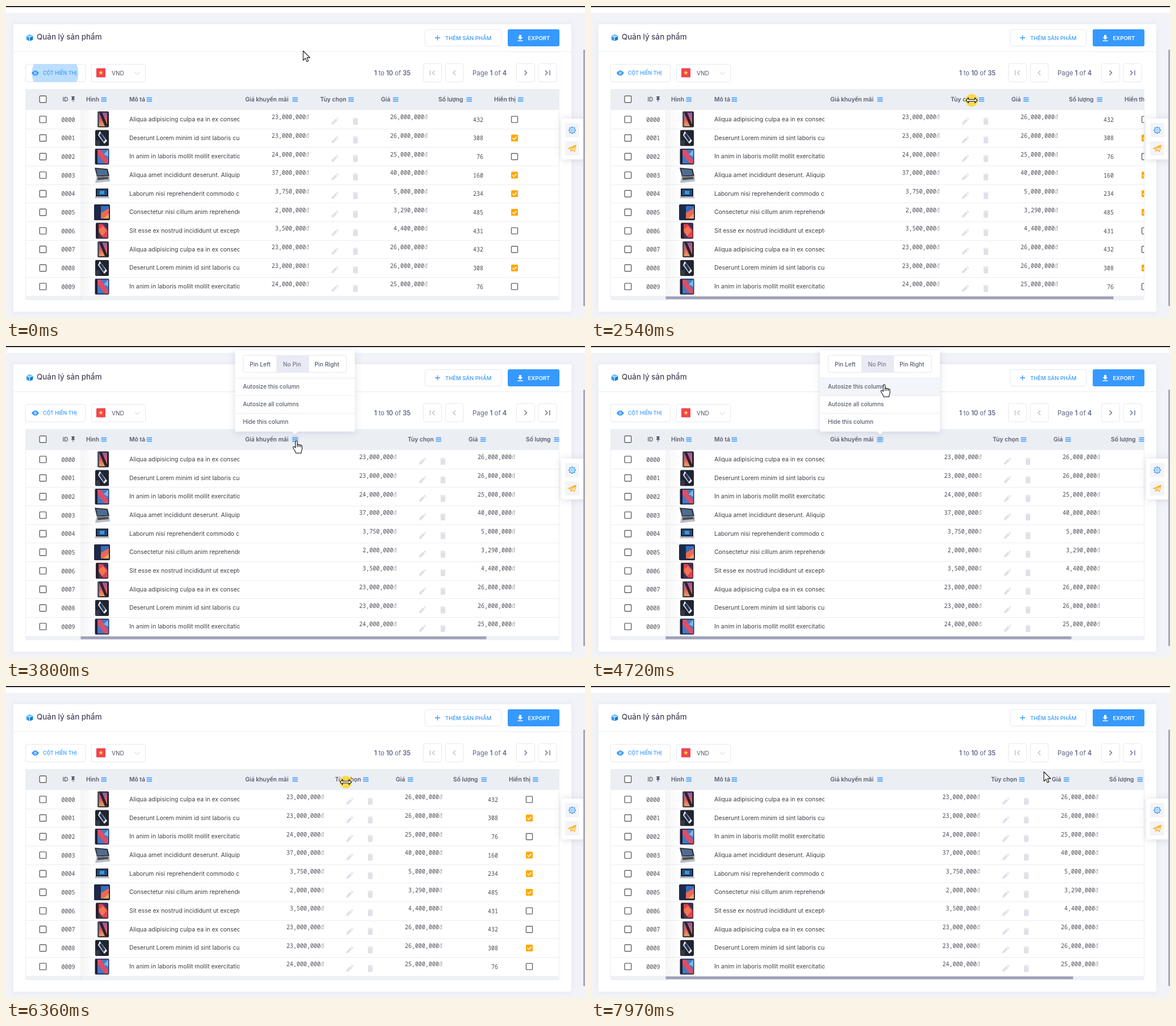
An HTML page for the animation above (8000 ms loop, 1019 px wide and 549 px high).

```html
<!DOCTYPE html>
<html lang="vi">
<head>
<meta charset="utf-8">
<title>Quản lý sản phẩm</title>
<style>
  html, body { margin: 0; width: 100%; height: 100%; overflow: hidden; background: #f2f3f8; }
  svg { display: block; width: 100%; height: 100%; font-family: Inter, "Noto Sans", sans-serif; }
  text { white-space: pre; }
  .mono { font-family: "Noto Sans Mono", monospace; }
</style>
</head>
<body>
<svg id="stage" viewBox="0 0 1019 549"></svg>
<script>
const BLUE = '#3699ff', INK = '#595d6e', SLATE = '#5d6488', LINE = '#e6e8ef', ORANGE = '#ffa800';

// drawing helpers
const rect = (x, y, w, h, fill, more = '') =>
  `<rect x="${x}" y="${y}" width="${w}" height="${h}" fill="${fill}" ${more}/>`;
const box = (x, y, w, h, fill = '#fff') => rect(x + .5, y + .5, w - 1, h - 1, fill, `rx="3" stroke="${LINE}"`);
const path = (d, fill, more = '') => `<path d="${d}" fill="${fill}" ${more}/>`;
const line = (d, color, w = 1, more = '') => path(d, 'none', `stroke="${color}" stroke-width="${w}" ${more}`);
const text = (x, y, s, size, color = INK, weight = 400, more = '') =>
  `<text x="${x}" y="${y}" font-size="${size}" fill="${color}" font-weight="${weight}" ${more}>${s}</text>`;
const mono = (x, y, s, anchor = 'start') =>
  text(x, y, s, 10, '#4c4e58', 400, `class="mono" text-anchor="${anchor}"`);
const at = (x, y, s, id = '') => `<g ${id && `id="${id}"`} transform="translate(${x} ${y})">${s}</g>`;
const bold = s => `<tspan font-weight="600">${s}</tspan>`;

const bars = x => line(`M${x} 161.5h9.5m-9.5 3h9.5m-9.5 3h9.5`, BLUE, 1.3);
const head = (x, s, iconX) => text(x, 168, s, 10.3, INK, 600) + bars(iconX);
const check = (x, y, on, s = 11) => on
  ? rect(x - 6, y - 6, 12, 12, ORANGE, 'rx="1.5"') + line(`M${x - 3.5} ${y}l2.5 2.7 4.6-5`, '#fff', 1.5)
  : rect(x - s / 2, y - s / 2, s, s, '#fff', 'rx="1" stroke="#626469" stroke-width="1.4"');
const pencil = path('M-6 6v-3l7-7 3 3-7 7zM2-5l1.500-1.300 3 3-1.500 1.300z', '#dfe1e9');
const bin = path('M-4-3.500h8v9q0 1-1 1h-6q-1 0-1-1zM-5-5h3l.6-1h2.800l.6 1h3v1h-10z', '#dfe1e9');

// product thumbnails, centred on 0,0
const phone = (w, color) => rect(-w / 2, -14, w, 28, color, 'rx="2"');
const thumbs = {
  wave: at(2, 0, phone(20, '#24232d') + rect(-7, -12, 14, 24, 'url(#dusk)') +
    path('M-7-12h5L7 9v3H3z', '#29212f') + rect(-10, -13, 3, 26, '#55535d')),
  slant: phone(24, '#20242f') + path('M-4-12L9 5 4 10-7-5z', '#f2f4f8') +
    path('M-2-9L6 3 3 7-5-5z', '#26365b') + rect(-11, 4, 7, 9, '#343a48'),
  tablet: phone(25, '#27345a') + rect(-8, -12, 19, 24, '#4779c5') +
    path('M-8-12h6L11 8v4H5L-8-4z', '#e24c63') + path('M11-12v12L3-4z', '#78b9e9') + rect(-12, -12, 4, 25, '#1b2035'),
  laptop: path('M-13-13L10-11 13 2-9 3z', '#31343d') + path('M-10-11L8-9 10 0-8 1z', '#4e6c91') +
    path('M-10 3L13 2l1 9-26 3z', '#b9bdc4') + path('M-8 4l19-1 1 4-20 2z', '#4c5059'),
  dark: rect(-11, -9, 22, 14, '#171c29') + rect(-9, -7, 18, 10, '#234b83') +
    rect(-4, -5, 8, 6, '#4098d5') + path('M-12 5h24l1 3h-26z', '#b4b8c0'),
  sunset: phone(28, '#1d2947') + rect(-2, -11, 14, 22, '#386abb') +
    path('M-2 11V1L12-7v8L5 11z', '#ed6951') + path('M2 11L12 2v9z', '#f3a65b'),
  bloom: phone(22, '#25202c') + rect(-6, -12, 16, 24, '#df4053') +
    path('M-6-2L2-8 8 0 0 10z', '#f1784e') + path('M10-12v11L1-12zM-6 3L2 12h-8z', '#36345d')
};

// name, description, sale price, price, stock, visible
const items = [
  ['wave', 'Aliqua adipisicing culpa ea in ex consec', '23,000,000', '26,000,000', 432, 0],
  ['slant', 'Deserunt Lorem minim id sint laboris cupi', '23,000,000', '26,000,000', 308, 1],
  ['tablet', 'In anim in laboris mollit mollit exercitation', '24,000,000', '25,000,000', 76, 0],
  ['laptop', 'Aliqua amet incididunt deserunt. Aliquip', '37,000,000', '40,000,000', 160, 1],
  ['dark', 'Laborum nisi reprehenderit commodo cu', '3,750,000', '5,000,000', 234, 1],
  ['sunset', 'Consectetur nisi cillum anim reprehenderit', '2,000,000', '3,290,000', 485, 1],
  ['bloom', 'Sit esse ex nostrud incididunt ut excepteur', '3,500,000', '4,400,000', 431, 0]
];
const rows = [...items, ...items.slice(0, 3)];
const rowY = i => 199.6 + 32.67 * i;
const price = (x, y, s) => mono(x, y, s + '<tspan fill="#a3a5ae">đ</tspan>', 'end');

const fixedCells = rows.map(([kind, desc], i) => {
  const y = rowY(i);
  return rect(34, Math.round(y + 16), 940, 1, '#ebedf2') + check(65, y, 0, 11.5) +
    mono(97.5, y + 4, '000' + i) + at(169, y, thumbs[kind]) +
    text(217, y + 3.4, desc, 10.4, '#3f4047', 400, 'clip-path="url(#descClip)"');
}).join('');

const movingCells = rows.map(([, , sale, full, stock, on], i) => {
  const y = rowY(i);
  return price(533.5, y - .4, sale) + at(579, y + 3, pencil) + at(615, y + 3, bin) +
    price(742, y - .4, full) + mono(840, y + 4, stock, 'end') + check(895, y, on);
}).join('');

const pager = (x, d, color) => box(x, 101, 33, 33) + at(x + 16.5, 117.5, line(d, color, 1.3));
const star = Array.from({ length: 10 }, (_, i) => {
  const r = i % 2 ? 1.7 : 4.2, a = i * Math.PI / 5;
  return `${167 + r * Math.sin(a)},${117.5 - r * Math.cos(a)}`;
}).join(' ');

const page =
  rect(0, 0, 1019, 549, '#f2f3f8') + rect(0, 0, 1019, 12, '#fff') + rect(0, 0, 1019, 2, '#1f1f24') +
  rect(13, 32, 982, 506, '#fff', 'rx="4" filter="url(#soft)"') + rect(13, 80, 982, 1, '#ebedf2') +
  path('M36 52l5.500-2.500 6 2.500-6 2.500z', '#7cc7fa') + path('M36 53l5 2.300v6.500l-5-2.500z', '#2f9bea') +
  path('M47.500 53l-5.500 2.300v6.500l5.500-2.500z', '#147fd0') +
  text(54, 59, 'Quản lý sản phẩm', 13.4, '#48465b', 500) +
  box(737, 41, 135, 30) + line('M755 56h9m-4.500-4.500v9', BLUE, 1.3) +
  text(773, 59.5, 'THÊM SẢN PHẨM', 9.5, BLUE, 500) +
  rect(883, 41, 91, 30, BLUE, 'rx="3"') + path('M903 51h4v4h2.500l-4.500 4.500-4.500-4.500h2.500zM900.500 60.500h9v1.500h-9z', '#fff') +
  text(918.5, 59.5, 'EXPORT', 9.6, '#fff', 600) +
  box(34, 102, 106, 32) +
  '<g clip-path="url(#btnClip)"><circle id="ripple" cx="86.500" cy="118" r="40" fill="#bcdeff"/></g>' +
  path('M45 118q6.500-9 13 0-6.500 9-13 0z', BLUE) + '<circle cx="51.500" cy="118" r="2.200" fill="#fff"/>' +
  '<circle cx="51.500" cy="118" r="1.200" fill="#3699ff"/>' +
  text(65, 121.3, 'CỘT HIỂN THỊ', 8.9, BLUE, 500) +
  box(150, 102, 96, 32) + rect(159, 109.5, 16, 16, '#f24350', 'rx="1"') +
  `<polygon points="${star}" fill="#ffda44"/>` + text(186, 121.5, 'VND', 10, '#4f5264') +
  line('M226.500 116l4.500 4.500 4.500-4.500', '#c9ccd6') +
  text(648, 121.5, `${bold(1)} to ${bold(10)} of ${bold(35)}`, 11.1, SLATE) +
  text(821, 121.5, `Page ${bold(1)} of ${bold(4)}`, 11.4, SLATE) +
  pager(734, 'M-4-4.500v9M4-4l-4 4 4 4', '#b9bcca') + pager(772.5, 'M2-4l-4 4 4 4', '#b9bcca') +
  pager(898, 'M-2-4l4 4-4 4', SLATE) + pager(936.5, 'M-4-4l4 4-4 4M4-4.500v9', SLATE);

const table =
  rect(34.5, 146.5, 939, 370.5, '#fff', `rx="3" stroke="#ebedf2"`) +
  path('M34 183v-34q0-3 3-3h934q3 0 3 3v34z', '#ebeef3') +
  fixedCells + rect(131, 183, 26, 327, 'url(#pin)') +
  check(65, 164, 0, 11.5) + text(99.5, 167.5, 'ID', 9.8, INK, 600) +
  path('M115 159h6v1.200h-1v3l1.500 2h-3v3.500h-1v-3.500h-3l1.500-2v-3h-1z', INK) +
  head(141, 'Hình', 167.5) + head(217, 'Mô tả', 247.5) +
  '<rect id="iconHover" x="501" y="157" width="15" height="15" rx="7" fill="#dce0e9"/>' +
  head(421, 'Giá khuyến mãi', 504) +
  '<g clip-path="url(#gridClip)">' + at(0, 0,
    head(553, 'Tùy chọn', 602.5) + head(660, 'Giá', 681) + head(761, 'Số lượng', 810.5) +
    head(859, 'Hiển thị', 901) + movingCells, 'moving') + '</g>' +
  rect(34, 510, 940, 7.5, '#f0f1f6', 'rx="2"') + rect(131, 509, 1, 8, '#e4e6ee') +
  '<rect id="thumb" x="131.500" y="511" height="5" fill="#9fa3ba"/>';

const teeth = Array.from({ length: 8 }, (_, i) =>
  `<path d="M0-6.500v2.500" transform="rotate(${i * 45})" stroke="${BLUE}" stroke-width="2"/>`).join('');
const side =
  rect(977, 198, 50, 72, '#fff', 'rx="3" filter="url(#shade)"') +
  rect(984, 206, 25, 25, '#f3f4f8', 'rx="3"') + rect(984, 238, 25, 25, '#f3f4f8', 'rx="3"') +
  at(996.5, 218.5, teeth + `<circle r="4.700" fill="#f3f4f8" stroke="${BLUE}" stroke-width="1.200"/>` +
    `<circle r="1.900" fill="none" stroke="${BLUE}"/>`) +
  at(996.5, 250.5, line('M-6.500 0L6.500-5.500 4 5.500 0 2.500-2.500 5-3 1zM-3 1L6.500-5.500 0 2.500', ORANGE, 1.1)) +
  rect(1016, 77, 3, 451, '#a5a8b8');

const menu =
  '<g id="menu"><g filter="url(#shade)">' + rect(403, 7, 211, 143.5, '#fff', 'rx="2"') +
  path('M503 150h11l-5.500 5z', '#fff') + '</g>' +
  '<rect id="itemHover" x="403" y="57" width="211" height="30" fill="#f3f5fa"/>' +
  box(417, 16, 183, 31) + rect(476, 16.5, 56, 30, '#e9eaf4') +
  line('M476.500 16v31M532.500 16v31', LINE) + line('M403 56.500h211m-211 31h211m-211 31h211', '#ebedf2') +
  text(429, 35.5, 'Pin Left', 10.2, INK, 500) + text(487.5, 35.5, 'No Pin', 10.2, '#74788d', 500) +
  text(543, 35.5, 'Pin Right', 10.3, INK, 500) +
  ['Autosize this column', 'Autosize all columns', 'Hide this column']
    .map((s, i) => text(417, 75 + 31 * i, s, 10, INK, 500)).join('') + '</g>';

const outline = 'stroke="#111" stroke-width="1.100" stroke-linejoin="round"';
const cursor = '<g id="cursor"><circle id="press" r="11" fill="#ffd534" opacity=".85"/>' +
  path('M0 0v16.500l3.800-3.600 2.600 6 2.700-1.100-2.600-5.900h5.400z', '#fff', `id="arrow" ${outline}`) +
  path('M-1.600 12V1.400a1.600 1.600 0 0 1 3.200 0V7a1.600 1.600 0 0 1 3 .4 1.600 1.600 0 0 1 2.900.7 1.500 1.500 0 0 1 2.500 1.200V14' +
    'c0 3-1.500 4-1.700 7.500H-.8C-.9 18-5.500 14.500-5.800 11.500a1.500 1.500 0 0 1 2.400-1.200zM1.600 7v4M4.600 7.500v3.500M7.500 8.500v2.500',
    '#fff', `id="hand" ${outline}`) +
  path('M-10 0l4.500-4.500v3h11v-3L10 0 5.500 4.500v-3h-11v3z', '#fff', `id="resize" ${outline}`) + '</g>';

const $ = id => document.getElementById(id);
const shadow = (id, dy, blur, alpha) => `<filter id="${id}" x="-30%" y="-30%" width="160%" height="160%">
  <feDropShadow dx="0" dy="${dy}" stdDeviation="${blur}" flood-color="#52527a" flood-opacity="${alpha}"/></filter>`;
const clip = (id, x, y, w, h) => `<clipPath id="${id}">${rect(x, y, w, h, '#000', 'rx="3"')}</clipPath>`;

$('stage').innerHTML = `<defs>
  ${shadow('soft', 0, 5, .06)}${shadow('shade', 1, 6, .2)}
  ${clip('descClip', 210, 183, 201, 330)}${clip('gridClip', 131, 146, 842.5, 364)}${clip('btnClip', 35, 102, 104, 32)}
  <linearGradient id="pin"><stop stop-color="#28284c" stop-opacity=".05"/><stop offset="1" stop-color="#28284c" stop-opacity="0"/></linearGradient>
  <linearGradient id="dusk" x2="0" y2="1"><stop stop-color="#8a5bb0"/><stop offset=".5" stop-color="#dd5b60"/><stop offset="1" stop-color="#f1a05c"/></linearGradient>
  </defs>` + page + table + side + menu + cursor;

// time, x, y, shape: a(rrow), h(and), r(esize), p(ressed resize)
const moves = [
  [0, 523, 79, 'a'], [370, 527, 118, 'a'], [757, 534, 162, 'a'], [905, 532, 166, 'h'], [1140, 532, 166, 'h'],
  [1609, 540, 165, 'h'], [1760, 546, 162, 'a'], [1980, 546, 162, 'a'], [1990, 543, 171, 'r'], [2065, 543, 171, 'p'],
  [2229, 544, 171, 'p'], [2383, 580, 170, 'p'], [2461, 624, 168, 'p'], [2538, 670, 166, 'p'], [2616, 695, 166, 'p'],
  [2693, 698, 166, 'p'], [2765, 698, 165, 'a'], [3080, 495, 163, 'a'], [3300, 495, 163, 'a'], [3312, 503, 166, 'h'],
  [3390, 511, 167, 'h'], [3900, 511, 167, 'h'], [4320, 514, 110, 'h'], [4706, 516, 68, 'h'], [5100, 516, 68, 'h'],
  [5165, 520, 76, 'a'], [5713, 549, 162, 'a'], [5930, 549, 162, 'a'], [5940, 544, 169, 'r'], [6015, 544, 168, 'p'],
  [6178, 548, 168, 'p'], [6333, 598, 169, 'p'], [6488, 668, 170, 'p'], [6566, 694, 170, 'p'], [6643, 695, 170, 'p'],
  [6715, 697, 168, 'a'], [6953, 766, 162, 'a'], [7108, 790, 165, 'a'], [7200, 790, 165, 'a'], [7495, 814, 160, 'a'],
  [7740, 806, 147, 'a'], [7960, 797, 151, 'a']
];
const widen = [[2306, 0], [2383, 12], [2461, 36], [2538, 80], [2616, 126], [2693, 151], [2770, 154], [4740, 154],
  [5016, 0], [6178, 0], [6255, 4], [6333, 26], [6410, 54], [6488, 90], [6566, 124], [6643, 150], [6720, 151]];
const menuFade = [[3500, 0], [3770, 1], [4740, 1], [5016, 0]];
const rippleFade = [[2280, 1], [2460, 0]];

function span(keys, t) {
  let i = keys.findIndex(k => k[0] > t);
  if (i < 0) i = keys.length;
  const a = keys[Math.max(i - 1, 0)], b = keys[Math.min(i, keys.length - 1)];
  return [a, b, a === b ? 0 : (t - a[0]) / (b[0] - a[0])];
}
function value(keys, t, col = 1) {
  const [a, b, f] = span(keys, t);
  return a[col] + (b[col] - a[col]) * f;
}

const LOOP = 8000, STEP = 77.45, LEAD = 60;
const show = (id, on) => $(id).setAttribute('visibility', on ? 'inherit' : 'hidden');

function draw(ms) {
  // the screen is sampled at about 13 pictures a second
  const t = Math.max(0, LEAD + STEP * Math.floor((ms % LOOP - LEAD) / STEP));
  const wide = Math.round(value(widen, t)), open = value(menuFade, t);
  const x = Math.round(value(moves, t, 1)), y = Math.round(value(moves, t, 2)), shape = span(moves, t)[0][3];

  $('moving').setAttribute('transform', `translate(${wide} 0)`);
  $('thumb').setAttribute('width', 842 - (wide - 26));
  show('thumb', wide > 26);
  $('menu').setAttribute('opacity', open);
  $('iconHover').setAttribute('opacity', open);
  show('itemHover', y > 57 && y < 87);
  $('ripple').setAttribute('r', 41.7 + 1.7 * Math.cos((t - 810) / 2500 * 2 * Math.PI));
  $('ripple').setAttribute('opacity', value(rippleFade, t));

  $('cursor').setAttribute('transform', `translate(${x} ${y})`);
  show('arrow', shape === 'a');
  show('hand', shape === 'h');
  show('resize', shape === 'r' || shape === 'p');
  show('press', shape === 'p');
}

const start = performance.now();
function tick() {
  draw(performance.now() - start);
  requestAnimationFrame(tick);
}
tick();
</script>
</body>
</html>
```
